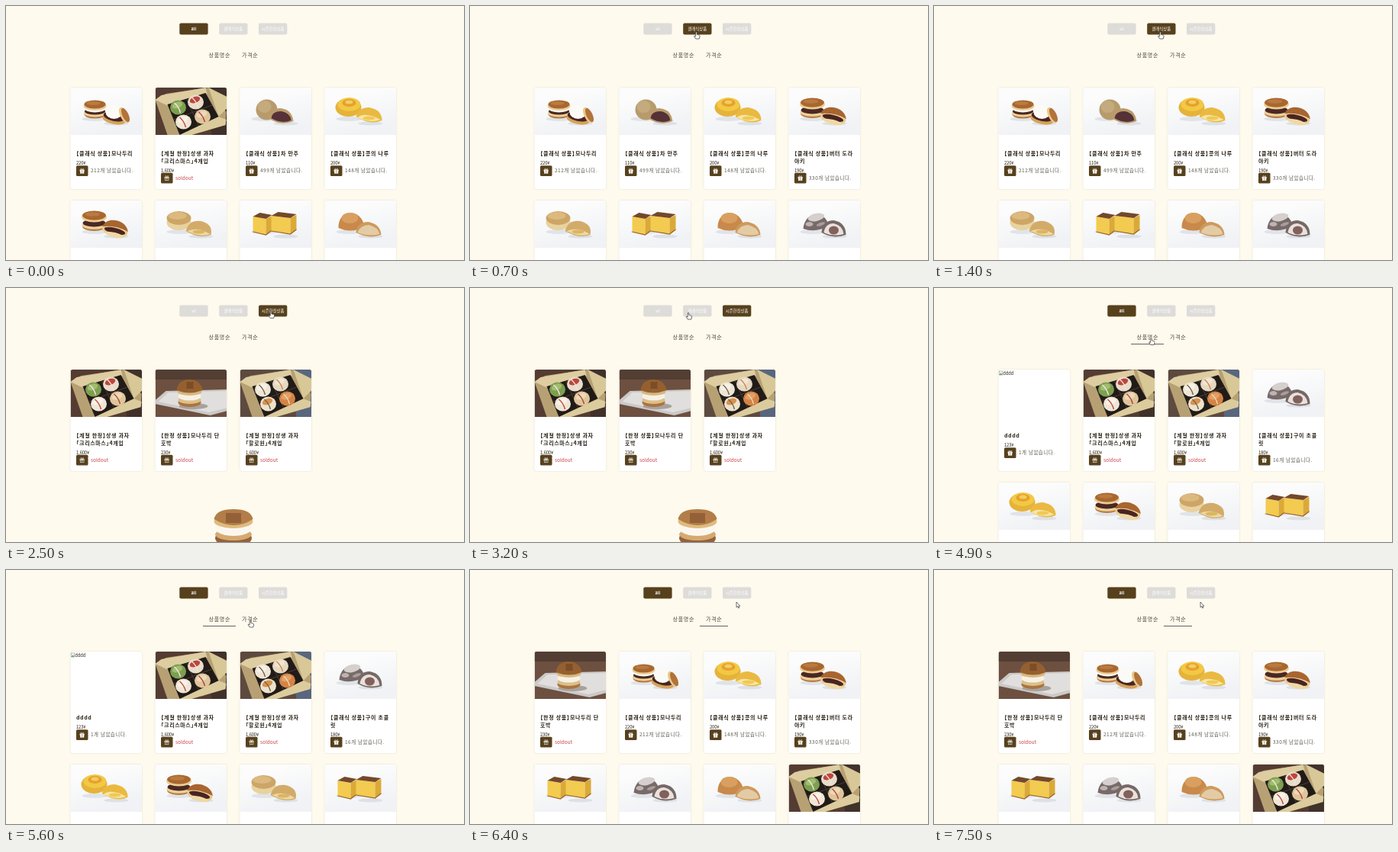
Animation, 600 px wide and 333 px high, one loop 7.6 s. Source, as an HTML page:

```html
<!DOCTYPE html>
<html lang="ko">
<head>
<meta charset="utf-8">
<style>
html, body { margin: 0; width: 100%; height: 100%; overflow: hidden; background: #fefaee; }
svg { display: block; width: 600px; height: 333px; }
text { font-family: "Noto Sans CJK KR", "Noto Sans CJK", "Noto Sans", sans-serif; fill: #2b2418; }
.title { font-size: 7px; font-weight: 700; letter-spacing: .6px; font-feature-settings: "halt"; }
.price { font-size: 5.8px; letter-spacing: -.1px; }
.stock { font-size: 6.5px; letter-spacing: .5px; fill: #5d5a50; }
.sold { font-size: 6.5px; fill: #c8434a; }
.btn { font-size: 5.4px; fill: #fff; text-anchor: middle; }
.sort { font-size: 7px; letter-spacing: .7px; fill: #4a453b; }
.card { filter: drop-shadow(0 .6px .8px rgba(70, 55, 20, .15)); }
</style>
</head>
<body>
<svg id="stage" viewBox="0 0 600 333"></svg>
<script>
const BROWN = '#57411d';

// Drawing helpers
const el = (x, y, rx, ry, fill, rot = 0) =>
  `<ellipse cx="${x}" cy="${y}" rx="${rx}" ry="${ry}" fill="${fill}" transform="rotate(${rot} ${x} ${y})"/>`;
const poly = (points, fill) => `<polygon points="${points}" fill="${fill}"/>`;
const path = (d, fill, extra = '') => `<path d="${d}" fill="${fill}" ${extra}/>`;
const rect = (x, y, w, h, fill, extra = '') =>
  `<rect x="${x}" y="${y}" width="${w}" height="${h}" fill="${fill}" ${extra}/>`;
const text = (x, y, cls, str, extra = '') => `<text x="${x}" y="${y}" class="${cls}" ${extra}>${str}</text>`;
const at = (x, y, body, rot = 0, scale = 1) =>
  `<g transform="translate(${x} ${y}) rotate(${rot}) scale(${scale})">${body}</g>`;

// Food parts
const shadow = el(34, 44, 17, 3, '#e0e3e8') + el(62, 50, 16, 2.5, '#dde0e5');
const light = body => rect(0, 0, 94, 62, 'url(#studio)') + at(-2, -3, shadow + body);
const bun = cream =>
  el(0, 9, 14, 5.5, '#b9793d') + el(0, 7.5, 14.5, 5, '#ecd198') +
  el(0, 5, 13.5, 4.5, '#4b2824') + (cream ? el(0, 1.5, 13.5, 5, '#fbf8f2') : '') +
  el(0, -2, 15, 6, '#ebcd92') + el(0, -4, 14, 5.5, '#a9672f') + el(-2, -5.5, 9, 2.5, '#b97a40');
const halfBun =
  el(0, 3, 17, 9, '#e9cb8c') + path('M-17 2C-15-13 12-14 17 1Z', '#a9652f') +
  path('M-16 2Q0-4 17 1Q2 4-16 2', '#efd8a3') + el(0, 4, 14, 4, '#4b2422') + el(1, 9, 13, 3, '#efd9a5');
const block = (x, y, w) =>
  poly(`${x},${y + 5} ${x + w - 8},${y + 8} ${x + w - 8},${y + 29} ${x},${y + 25}`, '#f2cb50') +
  poly(`${x + w - 8},${y + 8} ${x + w},${y + 4} ${x + w},${y + 23} ${x + w - 8},${y + 29}`, '#dba936') +
  poly(`${x},${y + 5} ${x + 9},${y} ${x + w},${y + 3} ${x + w - 8},${y + 8}`, '#74482a') +
  path(`M${x} ${y + 25}l${w - 8} 4l8-6`, 'none', 'stroke="#9a6128" stroke-width="1.2"');

const giftBox = (table, side, sweets) =>
  rect(0, 0, 94, 62, table) + poly('64,0 94,0 94,62 74,62', side) +
  poly('0,16 14,8 70,0 93,32 92,49 44,62 16,62', '#b7a073') +
  poly('0,16 8,10 66,0 68,8 17,24', '#ddcda0') + poly('70,0 94,12 94,27 83,38', '#d8c898') +
  poly('30,62 83,38 93,42 92,49 48,62', '#dccb9c') + poly('16,22 66,7 83,38 32,62', '#211b18') +
  path('M24 42L74 23M41 15L57 50', 'none', 'stroke="#4a3f36"') +
  [[30, 26], [53, 19], [37, 45], [62, 38]].map(([x, y], i) =>
    el(x, y, 10.5, 9.5, sweets[i][0]) + el(x - 1, y - 3, 7, 4, sweets[i][1], -20) +
    path(`M${x - 5} ${y - 6}Q${x + 1} ${y - 1} ${x + 3} ${y + 7}`, 'none', `stroke="${sweets[i][2]}" stroke-width="1.4"`)
  ).join('');

const photos = {
  cream: light(at(34, 29, bun(true)) +
    el(59, 45, 15, 6, '#d7a359', 12) + el(59, 41, 14, 6, '#492622', 12) + el(59, 35, 11, 9, '#fcfaf5') +
    el(72, 39, 5, 11, '#e9c88a', -25) + el(74, 39, 4, 10, '#b2733a', -25)),
  xmas: giftBox('#543c32', '#41312b', [
    ['#7d9f50', '#a2bd72', '#efe9d8'], ['#e9dccb', '#bd463d', '#f1e4d4'],
    ['#f0e6d6', '#f8f2e7', '#c0483e'], ['#dfc59b', '#ecd9b8', '#b5413a']]),
  tea: light(el(37, 32, 14, 13.5, '#b79b6c') + el(34, 28, 9, 8, '#c4aa7d') +
    path('M40 43Q41 31 54 30Q70 31 72 47Q54 54 40 43', '#bb9b6b') +
    path('M43 43Q44 34 56 34Q68 36 69 46Q56 51 43 43', '#553138')),
  citrus: light(el(33, 29, 17, 12, '#e5b33a') + el(34, 25, 15, 9, '#f2c845') + el(34, 23, 9, 5, '#e6a12d') +
    el(34, 22, 5, 2.5, '#f3cd60') + path('M43 41Q46 29 60 29Q77 32 77 46Q62 53 43 41', '#eab941') +
    path('M45 42Q55 34 75 45Q61 50 45 42', '#f7e6a6') + el(60, 43, 8, 2.5, '#efc956')),
  butter: light(at(33, 27, bun(false), 0, 1.1) + at(61, 39, halfBun, 14)),
  puff: light(el(33, 32, 16, 10, '#e8d2a0') + el(33, 26, 16, 9, '#cda566') + el(31, 23, 12, 5, '#dcb97f') +
    path('M42 43Q46 28 62 30Q78 34 75 48Q61 54 42 43', '#d3ab69') +
    path('M44 43Q60 37 74 47Q62 52 44 43', '#ecd8a5') + el(59, 44, 8, 2.5, '#d9b660')),
  sponge: light(block(19, 19, 25) + block(43, 18, 33)),
  dome: light(path('M20 39C19 14 50 12 54 37Q38 47 20 39', '#c9894a') + el(35, 26, 11, 7, '#d99f60') +
    path('M43 45Q45 31 59 31Q75 34 76 48Q60 54 43 45', '#cd9a5b') +
    path('M45 45Q49 35 60 35Q72 38 74 47Q60 51 45 45', '#e3cba5')),
  choco: light(path('M21 40C23 17 50 14 54 36Q38 46 21 40', '#786a69') + el(38, 25, 11, 5, '#d5cfcd', -12) +
    el(29, 34, 5, 3, '#bdb4b1') + el(44, 34, 6, 2, '#a89d9a', -20) +
    path('M45 45Q46 29 61 29Q77 32 77 48Q60 54 45 45', '#766866') +
    path('M48 45Q50 33 61 33Q73 36 74 47Q60 51 48 45', '#e9e1dc') + el(61, 42, 6.5, 5.5, '#82605c')),
  sweet: rect(0, 0, 94, 62, '#6d5040') + rect(0, 0, 94, 13, '#533e33') +
    poly('14,28 94,26 94,54 72,60 0,45 0,40', '#cbc9c7') + poly('17,30 94,28 94,50 70,56 4,42', '#e1dfde') +
    el(50, 48, 19, 4, '#a9a29c') + el(45, 43, 15, 6, '#a9743f') + el(45, 40, 15, 5, '#dcbf88') +
    el(45, 35, 15, 5.5, '#f7f0e5') + el(45, 29, 16, 5, '#d8b77e') +
    path('M28 27Q30 13 45 13Q60 14 62 27Q46 34 28 27', '#95602f') + rect(41, 16, 9, 9, '#7d4c28'),
  pumpkin: giftBox('#5d4a3f', '#58667e', [
    ['#eee5d6', '#f6f0e5', '#71614f'], ['#e6d9c2', '#efe5d2', '#d18545'],
    ['#eee2cc', '#d9924d', '#6d6750'], ['#d58345', '#e2a067', '#ecd9b4']]),
  broken: rect(.8, 2, 4.5, 5, '#fff', 'stroke="#8b948d" stroke-width=".6"') + path('M1 7l2-3l2 3', '#65a85b') +
    text(5.8, 7, 'price', 'dddd')
};

// Title lines, price, stock left (0 = sold out)
const goods = {
  cream: [['【클래식 상품】모나두리'], '220', 212],
  xmas: [['【계절 한정】상생 과자', '「크리스마스」4개입'], '1,600', 0],
  tea: [['【클래식 상품】차 만주'], '110', 499],
  citrus: [['【클래식 상품】콩의 나루'], '200', 148],
  butter: [['【클래식 상품】버터 도라', '야키'], '190', 330],
  choco: [['【클래식 상품】구이 초콜', '릿'], '180', 16],
  sweet: [['【한정 상품】모나두리 단', '호박'], '230', 0],
  pumpkin: [['【계절 한정】상생 과자', '「할로윈」4개입'], '1,600', 0],
  broken: [['dddd'], '123', 1]
};

function gift(y, sold) {
  const line = 'stroke="#fff" stroke-width=".5"';
  const paint = sold ? 'none' : '#fff';
  return rect(7.5, y, 15.5, 13.7, BROWN, 'rx="1.5"') +
    at(15.2, y + 5.6, rect(-2.8, 0, 5.6, 1.4, paint, line) + rect(-2.3, 1.4, 4.6, 3, paint, line) +
      path('M0 0q-3-.3-1.7-1.8q1.2-.4 1.7 1.8q.5-2.2 1.7-1.8q1.3 1.5-1.7 1.8', 'none', line) +
      path('M0 0v4.4', 'none', `stroke="${sold ? '#fff' : BROWN}" stroke-width=".5"`));
}

function card(name, i) {
  let body = rect(0, 0, 93.5, 133, '#fff', 'rx="3" class="card"') +
    `<g clip-path="url(#photo)">${photos[name]}</g>`;
  if (i < 4) {
    const [title, price, left] = goods[name];
    const y = (title.length - 1) * 9.5;
    body += title.map((s, n) => text(7.5, 89 + n * 9.5, 'title', s)).join('') +
      text(7.5, 101 + y, 'price', price + '¥') + gift(102.3 + y, !left) +
      (left ? text(26.5, 111.3 + y, 'stock', left + '개 남았습니다.') : text(26.5, 111.3 + y, 'sold', 'soldout'));
  }
  return at(84.5 + i % 4 * 111, 107 + (i >> 2) * 148, body);
}

const footerBun = el(298, 328, 24, 11, '#96603a') + el(298, 323, 24, 8, '#d5aa70') +
  el(298, 315, 24, 10, '#fbf7ef') + el(298, 306, 25.5, 9, '#e0ba7e') +
  path('M272.5 303Q275 290 298 290Q321 290 323.5 303Q299 319 272.5 303', '#b27d48') +
  rect(288, 295, 20, 13, '#936038');

const buttons = [['all', 227.3], ['클래식상품', 279.2], ['시즌한정상품', 331]];
const sorts = [['상품명순', 265.5, 258, 43], ['가격순', 309, 301, 37]];

// start, active button, active sort, items
const views = [
  [0, 0, -1, 'cream xmas tea citrus butter puff sponge dome'],
  [600, 1, -1, 'cream tea citrus butter puff sponge dome choco'],
  [2000, 2, -1, 'xmas sweet pumpkin'],
  [3500, 0, -1, 'cream xmas tea citrus butter puff sponge dome'],
  [4500, 0, 0, 'broken xmas pumpkin choco citrus butter puff sponge'],
  [5700, 0, 1, 'sweet cream citrus butter sponge choco dome xmas']
];

const page = ([, tab, sort, items]) =>
  buttons.map(([label, x], i) =>
    rect(x, 22.6, 37.3, 15, i === tab ? BROWN : '#dddcd9', 'rx="2"') +
    text(x + 18.6, 32.1, 'btn', label, i === 0 && tab === 0 ? 'font-weight="700"' : '')).join('') +
  sorts.map(([label, x, lineX, w], i) =>
    text(x, 67.2, 'sort', label) + (i === sort ? rect(lineX, 73, w, 1, '#6d6350') : '')).join('') +
  items.split(' ').map(card).join('') + (tab === 2 ? footerBun : '');

const stage = document.getElementById('stage');
stage.innerHTML = `<defs>
  <linearGradient id="studio" x2=".35" y2="1"><stop offset=".25" stop-color="#fcfcfc"/><stop offset="1" stop-color="#f0f2f5"/></linearGradient>
  <clipPath id="photo"><path d="M0 62V3Q0 0 3 0H90.5Q93.5 0 93.5 3V62Z"/></clipPath></defs>` +
  views.map(v => `<g class="view">${page(v)}</g>`).join('') +
  `<g id="cursor" stroke="#333" stroke-width=".7" stroke-linejoin="round">
  <path id="arrow" d="M0 0V7L1.6 5.6L2.7 8L3.8 7.5L2.8 5.2H4.8Z" fill="#fff"/>
  <path id="hand" d="M-.8 .7Q0-.6.8.7V3.4L3.8 4.1Q4.8 4.4 4.5 6L3.8 9H-.8L-3 5.6Q-2.7 4.5-.8 6Z" fill="#fff"/></g>`;

const pages = stage.querySelectorAll('.view');
const [cursor, arrow, hand] = ['cursor', 'arrow', 'hand'].map(id => document.getElementById(id));
const show = (node, on) => node.style.display = on ? '' : 'none';

// time, x, y of the pointer tip
const track = [
  [100, 312, 11], [500, 296.5, 34], [1500, 296.5, 34], [1900, 347, 30.5], [2900, 347, 30.5], [3400, 253, 33],
  [4000, 253, 33], [4400, 284.5, 65.5], [5100, 284.5, 65.5], [5500, 320, 66], [5900, 320, 66],
  [6200, 352, 30], [6400, 349, 42], [7600, 349, 42]
];

function pointer(t) {
  const i = track.findIndex(k => k[0] > t);
  const [t0, x0, y0] = track[i - 1], [t1, x1, y1] = track[i];
  const u = (t - t0) / (t1 - t0), e = u * u * (3 - 2 * u);
  return [x0 + (x1 - x0) * e, y0 + (y1 - y0) * e];
}

function draw(now) {
  const t = Math.floor(now % 7600 / 100) * 100;
  const current = views.findLastIndex(v => v[0] <= t);
  pages.forEach((p, i) => show(p, i === current));
  show(cursor, t >= 100);
  if (t >= 100) {
    const [x, y] = pointer(t);
    const over = y > 22.6 && y < 37.6 && buttons.some(b => x > b[1] && x < b[1] + 37.3) ||
      y > 57 && y < 74 && x > 258 && x < 338;
    cursor.setAttribute('transform', `translate(${x} ${y})`);
    show(hand, over);
    show(arrow, !over);
  }
}

const start = performance.now();
function tick() {
  draw(performance.now() - start);
  requestAnimationFrame(tick);
}
tick();
</script>
</body>
</html>
```
